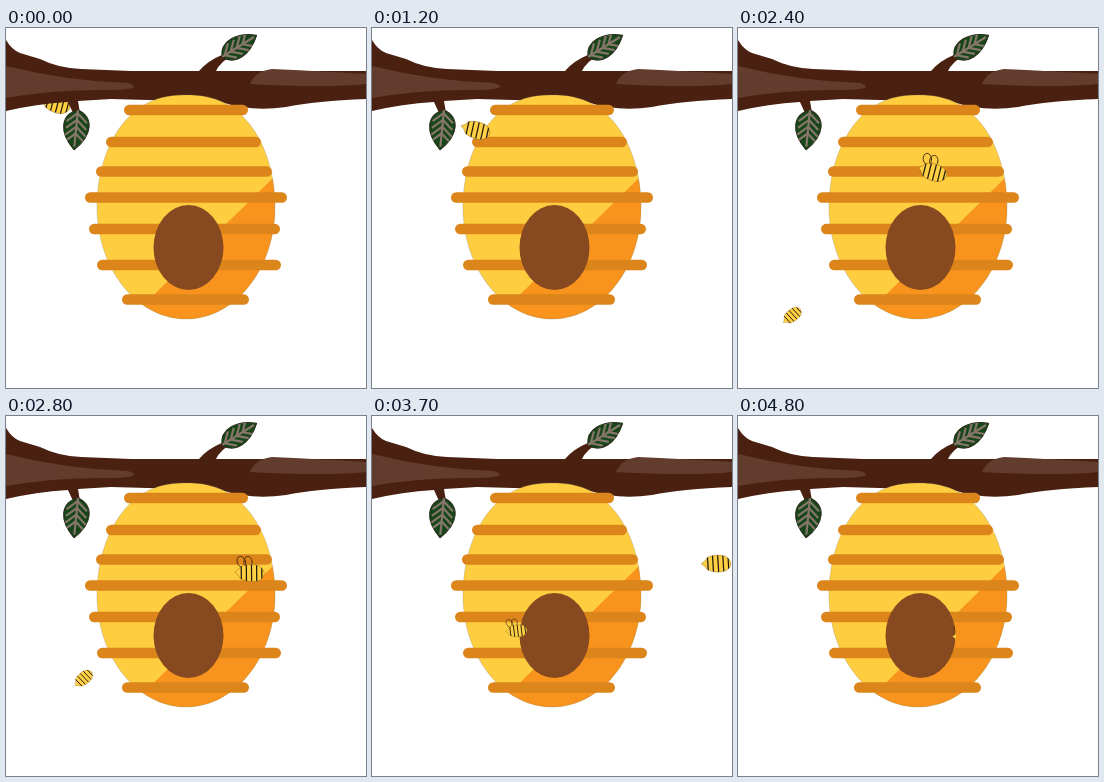
These frames come from a looping animation (360x360 px, 4900 ms). An HTML page with a canvas:

```html
<!DOCTYPE html>
<html lang="en">
<head>
<meta charset="utf-8">
<title>Beehive</title>
<style>
html, body { margin: 0; width: 100%; height: 100%; overflow: hidden; background: #fff; }
canvas { display: block; width: 360px; height: 360px; }
</style>
</head>
<body>
<canvas id="stage" width="360" height="360"></canvas>
<script>
const ctx = document.getElementById('stage').getContext('2d');
const LOOP = 4900, STEP = 100;

const branch = new Path2D(`M0 12Q6 22 14 25L34 31Q52 40 75 41L125 43H193Q201 33 218 26H228
  Q214 34 210 43H360V71Q310 73 280 79Q245 84 215 74L105 71L72 73L74 85H67L62 74Q30 76 0 83Z`);
const barkLeft = new Path2D('M0 38Q60 53 122 55Q140 61 105 62Q50 61 0 70Z');
const barkRight = new Path2D('M244 56Q249 43 266 41Q310 43 360 46V56Q320 60 244 56Z');

// An ellipse whose upper half is a little fuller.
const hive = new Path2D();
for (let a = 0; a < 2 * Math.PI; a += .05) {
  const c = Math.cos(a), s = Math.sin(a), w = Math.abs(c) ** (s < 0 ? .85 : 1);
  hive.lineTo(180 + 89 * Math.sign(c) * w, 179 + 112 * s);
}
hive.closePath();

const hole = new Path2D();
hole.ellipse(182.5, 219.5, 35, 42.5, 0, 0, 7);

// Room for the small bee: left of the hole's middle, plus the hole itself.
const entrance = new Path2D('M0 0H182.5V360H0Z');
entrance.ellipse(182.5, 219.5, 35.5, 42.5, 0, -Math.PI / 2, Math.PI / 2);

// Bars: centre x, half length, y.
const bars = [
  [180, 62, 82], [177.5, 77.5, 114], [178, 88, 143.5], [180, 101, 169.5],
  [178.5, 95.5, 201], [183, 92, 237], [179.5, 63.5, 271.5]
];

function fill(path, color) {
  ctx.fillStyle = color;
  ctx.fill(path);
}

function stroke(path, color, width) {
  ctx.strokeStyle = color;
  ctx.lineWidth = width;
  ctx.stroke(path);
}

function line(x1, y1, x2, y2) {
  ctx.beginPath();
  ctx.moveTo(x1, y1);
  ctx.lineTo(x2, y2);
  ctx.stroke();
}

function place(x, y, angle, size = 1) {
  ctx.translate(x, y);
  ctx.rotate(angle);
  ctx.scale(size, size);
}

function leaf(x, y, angle, len, wide) {
  ctx.save();
  place(x, y, angle);
  const side = w => `C${len * .15} ${w} ${len * .6} ${w} ${len} 0`;
  const shape = new Path2D(`M0 0${side(-wide)}M0 0${side(wide)}`);
  fill(shape, '#174619');
  stroke(shape, '#2b2a1b', 1);
  ctx.clip(shape);
  ctx.strokeStyle = '#87766a';
  ctx.lineWidth = 2.2;
  line(0, 0, len * .92, 0);
  for (let s = len * .08; s < len * .75; s += len * .17) {
    line(s, 0, s + 9, -wide * .6);
    line(s, 0, s + 9, wide * .6);
  }
  ctx.restore();
}

function drawTree() {
  fill(branch, '#4a2111');
  fill(barkLeft, '#623d2d');
  fill(barkRight, '#623d2d');
  leaf(216, 29, -.56, 41, 14);
  leaf(72, 82, 1.67, 40, 17);
}

function drawHive() {
  ctx.save();
  fill(hive, '#ffce40');
  ctx.clip(hive);
  fill(new Path2D('M270 147L118 296H290V147Z'), '#f8941e');
  ctx.restore();
  stroke(hive, 'rgba(130,120,100,.4)', .7);
  ctx.strokeStyle = '#dc851b';
  ctx.lineWidth = 10.6;
  ctx.lineCap = 'round';
  for (const [x, half, y] of bars) line(x - half + 5.3, y, x + half - 5.3, y);
  ctx.lineCap = 'butt';
  fill(hole, '#87491f');
}

// Keys: time, x, y, tilt in degrees.
const bigBee = [
  [0, 50, 76, 18], [1200, 104, 102, 16], [2000, 151, 126, 31],
  [2800, 244, 157, 3], [4000, 378, 143, 0]
];
const smallBee = [
  [1350, -14, 348, -35], [2000, 30.5, 310.5, -34], [2800, 77.5, 262.5, -40],
  [3300, 110, 221, -16], [4100, 179, 216, 5], [4900, 232, 222, 5]
];

// Smooth curve through the keys.
function pose(keys, t) {
  const last = keys.length - 1;
  if (t < keys[0][0] || t > keys[last][0]) return null;
  let i = 0;
  while (i < last - 1 && t >= keys[i + 1][0]) i++;
  const a = keys[i], b = keys[i + 1], span = b[0] - a[0], u = (t - a[0]) / span;
  const slope = (k, c) => {
    const p = keys[Math.max(0, k - 1)], q = keys[Math.min(last, k + 1)];
    return (q[c] - p[c]) / (q[0] - p[0]) * span;
  };
  const [x, y, tilt] = [1, 2, 3].map(c => {
    const d = b[c] - a[c], m = slope(i, c), n = slope(i + 1, c);
    return a[c] + u * (m + u * (3 * d - 2 * m - n + u * (m + n - 2 * d)));
  });
  return [x, y, tilt * Math.PI / 180];
}

const body = new Path2D('M-15 0Q-11 -2 -9 -6Q0 -10 9 -7Q19 0 9 7Q0 10 -9 6Q-11 2 -15 0Z');
const wings = new Path2D();
for (const x of [-9, -2.5]) {
  wings.moveTo(x + 4, -10.5);
  wings.ellipse(x, -10.5, 4, 5.5, x * .05, 0, 7);
}

function drawBee(at, size) {
  if (!at) return;
  // The clear wings only show against the hive.
  ctx.save();
  ctx.clip(hive);
  place(...at, size);
  stroke(wings, '#3a2410', .8);
  ctx.restore();

  ctx.save();
  place(...at, size);
  fill(body, '#ffd044');
  stroke(body, 'rgba(110,75,15,.55)', .6);
  ctx.clip(body);
  ctx.strokeStyle = '#21180c';
  ctx.lineWidth = 1.2;
  for (let x = -9; x <= 11; x += 5) line(x, -8, x + 1, 8);
  ctx.restore();
}

function draw(t) {
  ctx.fillStyle = '#fff';
  ctx.fillRect(0, 0, 360, 360);
  const big = pose(bigBee, t), hidden = t < 1000;
  if (hidden) drawBee(big, 1.03);
  drawTree();
  drawHive();
  if (!hidden) drawBee(big, 1.03);
  ctx.save();
  ctx.clip(entrance);
  drawBee(pose(smallBee, t), .75);
  ctx.restore();
}

const start = performance.now();
function tick() {
  const t = (performance.now() - start) % LOOP;
  draw(Math.floor(t / STEP) * STEP);
  requestAnimationFrame(tick);
}
tick();
</script>
</body>
</html>
```
